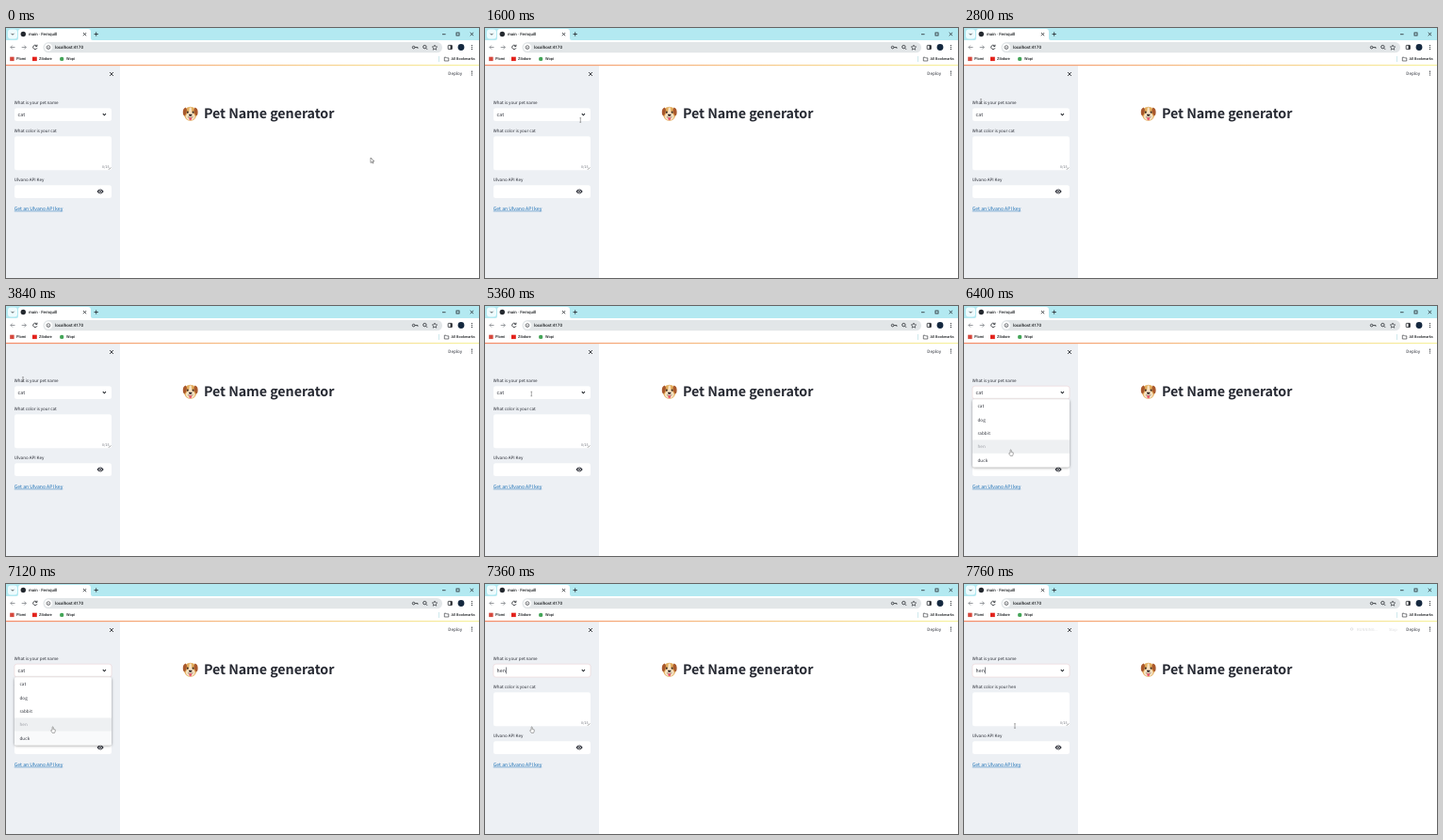
An HTML page for the animation above (8 s loop, 502 px wide and 266 px high).

```html
<!DOCTYPE html>
<html lang="en">
<head>
<meta charset="utf-8">
<title>Pet Name generator</title>
<style>
  html, body { margin: 0; width: 100%; height: 100%; overflow: hidden; background: #fff; }
  svg { display: block; width: 502px; height: 266px; }
  text { font: 500 4.52px "Noto Sans CJK JP", "Noto Sans CJK SC", "Noto Sans", sans-serif; fill: #262932; text-rendering: geometricPrecision; white-space: pre; }
  .ui text { font: 500 4px Roboto, sans-serif; fill: #1d2023; }
  .line { fill: none; stroke: #22262b; stroke-width: .8; }
  .value { font-size: 5.2px; letter-spacing: .1px; }
  .link { font-size: 5.1px; fill: #1a6fb5; text-decoration: underline; }
  .title { font-size: 14.25px; font-weight: 700; letter-spacing: -.06px; }
  #list text { letter-spacing: .16px; }
</style>
</head>
<body>
<svg viewBox="0 0 502 266">
  <defs>
    <linearGradient id="rainbow">
      <stop stop-color="#f58a66"/><stop offset="1" stop-color="#f6f3a0"/>
    </linearGradient>
    <filter id="shadow" x="-10%" y="-10%" width="120%" height="120%">
      <feDropShadow dx="0" dy=".8" stdDeviation="1.4" flood-opacity=".42"/>
    </filter>
  </defs>

  <!-- Browser window -->
  <g class="ui">
    <rect width="502" height="13" fill="#b3e9f1"/>
    <rect x="2" y="1.5" width="10" height="10" rx="3" fill="#eefbfd"/>
    <path class="line" d="M5.5 5.8l1.5 1.5 1.5-1.5"/>
    <path d="M11 13q2 0 2-2V4q0-3 3-3h71q3 0 3 3v7q0 2 2 2z" fill="#fff"/>
    <circle cx="18.3" cy="6.5" r="2.7" fill="#24292f"/>
    <text x="24" y="8" style="font-size:4.4px">main · Fernquill</text>
    <path class="line" d="M82 5l3.2 3.2m0-3.2L82 8.2M93.5 6.5h4.4m-2.2-2.2v4.4M463 6.7h3.6M492.7 4.8l3.4 3.4m0-3.4l-3.4 3.4"/>
    <rect class="line" x="478" y="5" width="3" height="3"/>

    <path class="line" d="M9.5 20.5h-4.6m2-2l-2 2 2 2M16.7 20.5h4.6m-2-2l2 2-2 2" style="stroke:#80858a"/>
    <path class="line" d="M32.6 19a2.2 2.2 0 1 0 .4 2.2M33 17.7v1.800h-1.800"/>
    <rect x="39.5" y="15" width="423.5" height="11.3" rx="5.6" fill="#e2e6e8"/>
    <circle cx="45" cy="20.6" r="4.2" fill="#fff"/>
    <circle class="line" cx="45" cy="20.6" r="1.9" style="stroke-width:.6"/>
    <path class="line" d="M45 20.2v1.5" style="stroke-width:.6"/>
    <text x="52" y="22.2" style="font-size:4.5px">localhost:4170</text>
    <g class="line">
      <circle cx="432.6" cy="20.6" r="1.3"/><path d="M434 20.6h3v1.2"/>
      <circle cx="444.4" cy="20.1" r="1.7"/><path d="M445.6 21.3l1.6 1.6"/>
      <path d="M455 18l.8 1.8 1.9.2-1.4 1.3.4 1.9-1.7-1-1.7 1 .4-1.9-1.4-1.3 1.9-.2z" style="stroke-width:.6"/>
      <rect x="469.2" y="18.4" width="4.2" height="4.2" rx=".5"/><path d="M472.4 18.4v4.2" style="stroke-width:1.6"/>
    </g>
    <circle cx="483" cy="20.5" r="3.4" fill="#14283f"/>
    <g id="menu" fill="#22262b"><circle cx="494.5" cy="18.6" r=".6"/><circle cx="494.5" cy="20.5" r=".6"/><circle cx="494.5" cy="22.4" r=".6"/></g>

    <rect x="4.2" y="30.7" width="4.4" height="4.4" fill="#d5483d"/>
    <text x="11" y="34.4">Plomi</text>
    <rect x="28" y="30.7" width="4.8" height="4.4" fill="#e3221c"/>
    <text x="35" y="34.4">Zibdore</text>
    <circle cx="59.2" cy="32.9" r="2.2" fill="#43a557"/>
    <text x="64" y="34.4">Wopi</text>
    <path d="M459.5 30v6" stroke="#b9dfe4" stroke-width=".7"/>
    <path class="line" d="M465.3 31.2h1.7l.6.7h2.2v3.1h-4.5z" style="stroke-width:.6"/>
    <text x="472.6" y="34.4" style="font-size:3.85px">All Bookmarks</text>
  </g>

  <!-- Page -->
  <rect y="40" width="121" height="226" fill="#edf0f4"/>
  <rect y="39" width="502" height="1.2" fill="url(#rainbow)"/>
  <path class="line" d="M110 47l4 4m0-4l-4 4"/>
  <text x="469.3" y="49.8">Deploy</text>
  <use href="#menu" y="27.6"/>
  <g id="running" opacity=".16">
    <circle class="line" cx="411.5" cy="48" r="1.3"/>
    <text x="417" y="49.6" style="font-size:4.1px">RUNNING...</text>
    <text x="451" y="49.6" style="font-size:4.1px">Stop</text>
  </g>

  <g id="dog" transform="translate(195.7 91.2) scale(.92) translate(-196 -91.2)">
    <path d="M190 86q2-3 6-3t6 3l1 8q-2 5.500-7 5.500t-7-5.500z" fill="#e3ae5e"/>
    <path d="M190.700 84q-3.500 1-3.300 6 .3 4.200 2.300 3.500 1.700-2 2.300-7zM201.300 84q3.500 1 3.300 6-.3 4.200-2.300 3.500-1.700-2-2.300-7z" fill="#a9582b"/>
    <path d="M195 84h2l.8 5.500q3.500 2 3.500 5.500-1.300 3.800-5.300 3.800t-5.300-3.800q0-3.500 3.500-5.500z" fill="#f6e3c4"/>
    <circle cx="192.800" cy="89.500" r="1.100" fill="#3a2a27"/><circle cx="199.200" cy="89.500" r="1.100" fill="#3a2a27"/>
    <path d="M194 91.700h4q.3 2-2 2.600-2.300-.6-2-2.600z" fill="#33282a"/>
    <path d="M193 95q3 1.600 6 0" stroke="#553a33" stroke-width=".6" fill="none"/>
    <path d="M194.500 95.700h3v2q-1.500 2.400-3 0z" fill="#e95a6d"/>
  </g>
  <text class="title" x="209.900" y="96.300">Pet Name generator</text>

  <text x="8.800" y="80.900">What is your pet name</text>
  <rect id="select" x="9" y="85.200" width="103" height="13.800" rx="2.500" fill="#fff" stroke-width=".4"/>
  <text id="value" class="value" x="12.600" y="93.900"></text>
  <path id="caret" d="M22.600 88.500v7" stroke="#262932" stroke-width=".6"/>
  <path class="line" d="M102.800 91.200l1.600 1.600 1.600-1.600" style="stroke-width:1.100"/>

  <text id="colorLabel" x="8.800" y="111.200"></text>
  <rect x="9" y="115.200" width="103" height="36" rx="2.500" fill="#fff"/>
  <text x="102" y="149.200" style="font-size:3.700px;fill:#6d7079">0/15</text>
  <path class="line" d="M109 150.700l2.200-2.200" style="stroke-width:.5"/>

  <text x="8.800" y="162.900">Ulvano API Key</text>
  <rect x="9" y="167.200" width="103" height="13.800" rx="2.500" fill="#fff"/>
  <path d="M96.500 174q3.600-4.800 7.200 0-3.600 4.800-7.200 0z" fill="#262932"/>
  <circle cx="100.100" cy="174" r="1.350" fill="#262932" stroke="#fff" stroke-width=".7"/>
  <text class="link" x="8.800" y="193.700">Get an Ulvano API key</text>

  <g id="list">
    <rect x="9" y="99.200" width="103" height="72" rx="2" fill="#fff" filter="url(#shadow)"/>
  </g>

  <g id="cursor">
    <path id="arrow" d="M-1-3v5.500l1.300-1.200.9 1.800.8-.4-.9-1.800h1.700z" fill="#fff" stroke="#333" stroke-width=".5"/>
    <path id="beam" d="M-.8-2.300h1.600M0-2.300v4.600M-.8 2.300h1.600" fill="none" stroke="#555" stroke-width=".5"/>
    <path id="hand" d="M-.9.300v-3q.6-.8 1.100 0v2l2 .6v2l-.7 1.500h-2.200l-1.600-2.300q0-.9.700-.5z" fill="#fff" stroke="#444" stroke-width=".45"/>
  </g>
</svg>
<script>
const $ = id => document.getElementById(id);
const LOOP = 8000, OPEN = 5440, CLOSE = 7360, RERUN = 7520;
const ROW = 14.4, TOP = 99.2;

// start ms, x, y, pointer shape
const moves = [
  [0, 388, 141, 'arrow'], [880, 104, 104, 'beam'], [1600, 101.3, 98, 'beam'],
  [2800, 18, 78, 'beam'], [4400, 52, 84, 'beam'], [4880, 25, 85, 'beam'],
  [5360, 49.3, 93.5, 'beam'], [5840, 48, 104, 'hand'], [5920, 47, 114, 'hand'],
  [6080, 47.5, 122, 'hand'], [6160, 48, 132, 'hand'], [6240, 49, 141, 'hand'],
  [6320, 50, 150, 'hand'], [6400, 50, 156, 'hand'], [6560, 50, 159, 'hand'],
  [6720, 49.5, 162, 'hand'], [6880, 49.5, 161, 'hand'], [7040, 50, 158, 'hand'],
  [7120, 50, 155, 'hand'], [7520, 53, 152, 'beam'], [7680, 54, 151, 'beam']
];

function add(parent, tag, attrs) {
  const el = document.createElementNS('http://www.w3.org/2000/svg', tag);
  for (const key in attrs) el.setAttribute(key, attrs[key]);
  return parent.appendChild(el);
}

const rows = ['cat', 'dog', 'rabbit', 'hen', 'duck'].map((name, i) => {
  const y = TOP + i * ROW;
  const band = add($('list'), 'rect', { x: 9, y, width: 103, height: ROW });
  const label = add($('list'), 'text', { x: 14.4, y: y + 8.9 });
  label.textContent = name;
  if (name === 'hen') label.style.fill = '#989aa2';
  return band;
});

const show = (id, on) => $(id).style.display = on ? '' : 'none';

function draw(t) {
  const [, x, y, shape] = moves.findLast(m => m[0] <= t);
  $('cursor').setAttribute('transform', `translate(${x} ${y})`);
  for (const id of ['arrow', 'beam', 'hand']) show(id, id === shape);

  const open = t >= OPEN && t < CLOSE;
  show('list', open);
  const hovered = t < 6080 ? 0 : Math.min(3, Math.floor((y - TOP) / ROW));
  rows.forEach((band, i) => band.setAttribute('fill',
    i === hovered ? '#eef0f2' : i === 4 && t >= 6560 ? '#f9fafb' : 'none'));

  $('select').setAttribute('stroke', t >= OPEN ? '#e6bfc2' : 'none');
  $('value').textContent = t < CLOSE ? 'cat' : 'hen';
  $('colorLabel').textContent = 'What color is your ' + (t < RERUN ? 'cat' : 'hen');
  show('caret', t >= CLOSE);
  show('running', t >= RERUN);
}

function tick() {
  draw(performance.now() % LOOP);
  requestAnimationFrame(tick);
}
tick();
</script>
</body>
</html>
```
